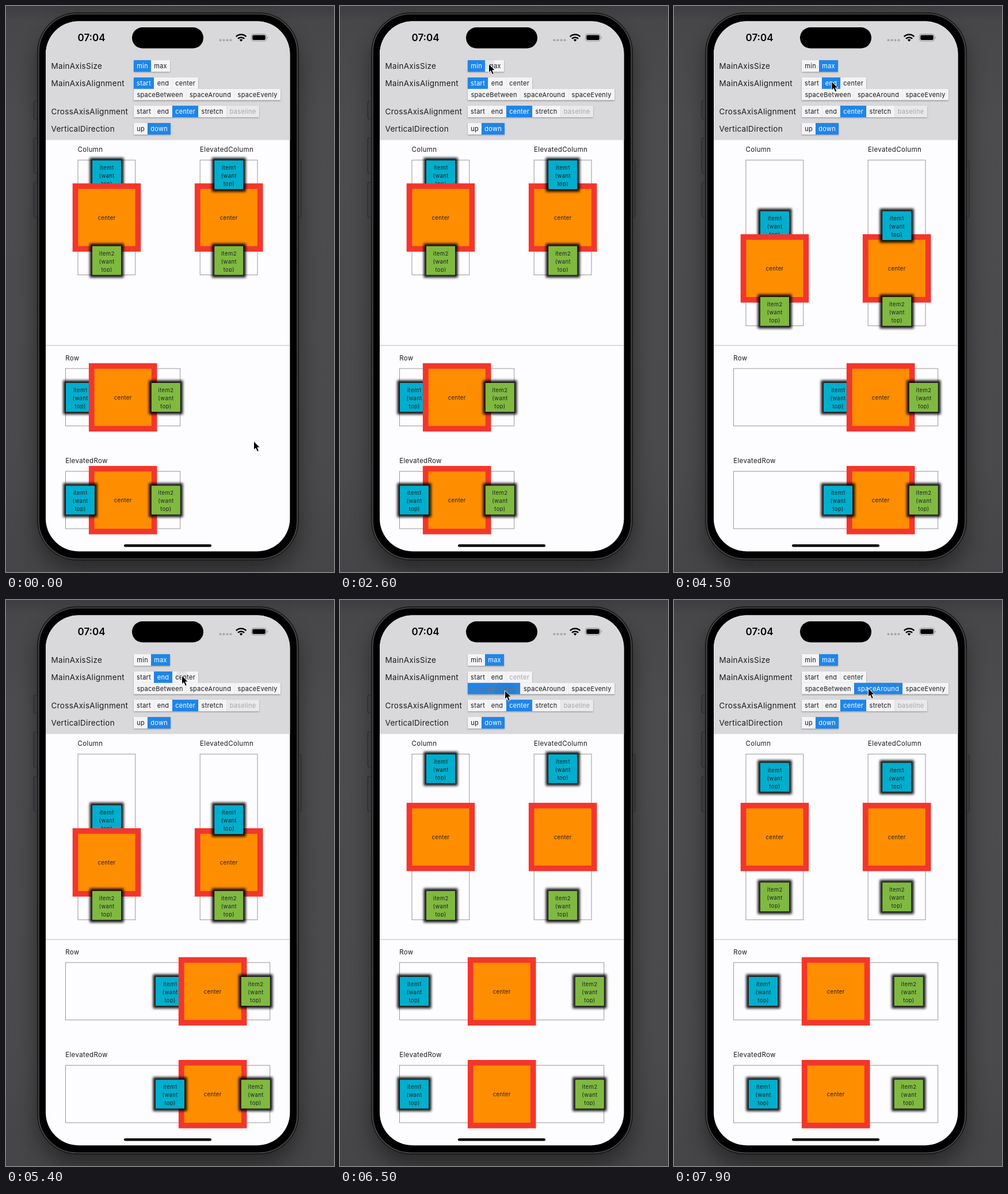
Write an HTML page that moves like this. It is 570 px wide and 982 px high and loops after 8 s.

```html
<!DOCTYPE html>
<html lang="en">
<head>
<meta charset="utf-8">
<title>Column and row alignment demo</title>
<style>
  html, body { margin: 0; width: 100%; height: 100%; overflow: hidden; background: #4a494b; }
  svg { display: block; }
  text { font-family: Inter, "Liberation Sans", sans-serif; fill: #1b1b1d; }
  .clock { font-size: 17px; font-weight: 600; fill: #000; }
  .label { font-size: 13.5px; letter-spacing: .3px; }
  .title { font-size: 11.5px; letter-spacing: .35px; }
  .toggle { font-size: 11px; letter-spacing: .28px; text-anchor: middle; }
  .note { font-size: 9.6px; letter-spacing: .35px; text-anchor: middle; fill: #1c2426; }
</style>
</head>
<body>
<svg id="stage" width="570" height="982" viewBox="0 0 570 982">
  <defs>
    <linearGradient id="wall" x2="0" y2="1">
      <stop offset="0" stop-color="#3e3d3f"/>
      <stop offset=".025" stop-color="#474648"/>
      <stop offset=".2" stop-color="#4c4b4d"/>
      <stop offset=".8" stop-color="#4a494b"/>
      <stop offset="1" stop-color="#454446"/>
    </linearGradient>
    <filter id="glow" x="-40%" y="-40%" width="180%" height="180%"><feGaussianBlur stdDeviation="2.3"/></filter>
    <filter id="soft" x="-10%" y="-30%" width="120%" height="170%"><feGaussianBlur stdDeviation="1.2"/></filter>
    <filter id="haze" x="-20%" y="-20%" width="140%" height="140%"><feGaussianBlur stdDeviation="18"/></filter>
    <clipPath id="screen"><rect x="69" y="26.5" width="424.4" height="919.7" rx="57"/></clipPath>
    <clipPath id="noteClip"><rect width="50" height="45"/></clipPath>
  </defs>

  <rect width="570" height="982" fill="url(#wall)"/>
  <rect x="54" y="34" width="455" height="946" rx="70" fill="#000" opacity=".4" filter="url(#haze)"/>
  <g fill="#3b3a3c" stroke="#29282a">
    <rect x="48" y="165" width="9" height="31" rx="2"/>
    <rect x="48" y="229" width="9" height="61" rx="2"/>
    <rect x="48" y="306" width="9" height="61" rx="2"/>
    <rect x="506" y="268" width="7" height="99" rx="2"/>
  </g>
  <rect x="54.5" y="11.5" width="454" height="950" rx="69" fill="#252527" stroke="#161617"/>
  <rect x="57" y="14" width="449" height="945" rx="66" fill="#000" stroke="#59585b" stroke-width="1.2"/>

  <g clip-path="url(#screen)">
    <rect x="69" y="26" width="425" height="921" fill="#fdfcff"/>
    <rect x="69" y="26" width="425" height="206.5" fill="#d9d8da"/>
    <path d="M69 589H494" stroke="#bbbabd"/>
    <g id="board"></g>
  </g>

  <rect x="219" y="37" width="124" height="36.5" rx="18.25"/>
  <text class="clock" x="124.5" y="61">07:04</text>
  <g id="signal" fill="#a5a4a6"></g>
  <g fill="none" stroke="#000" stroke-width="2.5">
    <path d="M399.8 53.2a12.6 12.6 0 0 1 17.6 0M403 56.7a8 8 0 0 1 11.2 0"/>
    <path d="M405.8 58.8a4 4 0 0 1 5.6 0L408.6 61.8z" fill="#000" stroke="none"/>
  </g>
  <rect x="426.5" y="48.8" width="26" height="12" rx="3.8" fill="none" stroke="#8b8a8c"/>
  <rect x="428.2" y="50.5" width="22.6" height="8.6" rx="2.3"/>
  <path d="M454 52.8q2.4 2 0 4z" fill="#8b8a8c"/>
  <rect x="205" y="934" width="152" height="4.5" rx="2.25"/>

  <path id="cursor" d="M0 0V15.2L3.4 12L6.1 18.2L8.9 17L6.3 11H11z" stroke="#fff" stroke-width="1" stroke-linejoin="round"/>
</svg>
<script>
const LOOP = 8000, STEP = 100, UNIT = 49.6, FADE = 130;
const BLUE = '#2085e8', PALE = '#f4f3f6';
const board = document.getElementById('board');
const cursor = document.getElementById('cursor');

function add(parent, tag, attrs = {}, text) {
  const el = document.createElementNS('http://www.w3.org/2000/svg', tag);
  for (const k in attrs) el.setAttribute(k, attrs[k]);
  if (text) el.textContent = text;
  parent.appendChild(el);
  return el;
}
const place = (el, x, y) => el.setAttribute('transform', `translate(${x} ${y})`);

for (let i = 0; i < 4; i++) {
  add(document.getElementById('signal'), 'circle', { cx: 372.5 + i * 6, cy: 59.3, r: 2 });
}

// Toggle rows: name, top edge, then label and right edge of each button
const toggles = {};
function toggleRow(group, y, ...cells) {
  const h = 20, right = cells[cells.length - 1][1];
  add(board, 'rect', { x: 222, y: y + 1.2, width: right - 222, height: h, fill: '#000', opacity: .3, filter: 'url(#soft)' });
  let x = 222;
  for (const [name, end] of cells) {
    const w = end - x, off = name === 'baseline';
    const box = add(board, 'svg', { x, y, width: w, height: h });
    const bg = add(box, 'rect', { width: w, height: h, fill: off ? '#e9e8eb' : PALE });
    if (x > 222) add(box, 'path', { d: `M.5 0V${h}`, stroke: '#000', opacity: .04 });
    const splash = add(box, 'circle', { fill: '#000', opacity: 0 });
    const text = add(box, 'text', { class: 'toggle', x: w / 2 + .1, y: 14 }, name);
    if (off) text.style.fill = '#a5a4a7';
    else toggles[group + name] = { x, y, bg, splash, text };
    x = end;
  }
}
function label(text, y) {
  add(board, 'text', { class: 'label', x: 78.5, y }, text);
}
label('MainAxisSize', 109);
label('MainAxisAlignment', 138.6);
label('CrossAxisAlignment', 188);
label('VerticalDirection', 217.7);
toggleRow('size', 94, ['min', 252], ['max', 285]);
toggleRow('main', 124, ['start', 257], ['end', 289], ['center', 334]);
toggleRow('main', 143.6, ['spaceBetween', 313], ['spaceAround', 397], ['spaceEvenly', 477]);
toggleRow('cross', 173, ['start', 257], ['end', 289], ['center', 334], ['stretch', 383], ['baseline', 440]);
toggleRow('dir', 203, ['up', 246], ['down', 286]);

function makeItem(parent, name, fill) {
  const g = add(parent, 'g');
  add(g, 'rect', { x: -4.5, y: -4.5, width: 59, height: 59, filter: 'url(#glow)', opacity: .9 });
  add(g, 'rect', { width: 50, height: 50, fill });
  const notes = add(g, 'g', { 'clip-path': 'url(#noteClip)' });
  [name, '(want', 'top)'].forEach((s, i) => add(notes, 'text', { class: 'note', x: 25.2, y: 16.2 + i * 13.9 }, s));
  return g;
}
function makeCenter(parent) {
  const g = add(parent, 'g');
  add(g, 'rect', { x: -59.3, y: -59.3, width: 118.6, height: 118.6, fill: '#f3362c' });
  add(g, 'rect', { x: -49.6, y: -49.6, width: 99.2, height: 99.2, fill: '#ff8d00' });
  add(g, 'text', { class: 'note', x: 0, y: 3.9 }, 'center');
  return g;
}

// A line of three boxes; main is the start on its axis, mid the middle of the other
function makeLine(title, tx, ty, row, elevated, main, mid) {
  add(board, 'text', { class: 'title', x: tx, y: ty }, title);
  const outline = add(board, 'rect', { fill: 'none', stroke: '#98979a' });
  const order = elevated ? 'cab' : 'acb', parts = {};
  for (const k of order) {
    parts[k] = k === 'c' ? makeCenter(board)
      : makeItem(board, k === 'a' ? 'item1' : 'item2', k === 'a' ? '#00aecd' : '#80b940');
  }
  const free = row ? 156 : 88.3;
  return (size, align) => {
    const room = size === 'max' ? free : 0;
    const len = UNIT * 4 + .8 + room;
    const set = (el, along, across) => row ? place(el, main + along, across) : place(el, across, main + along);
    const [a, c, b] = spread[align].map(f => f * room);
    set(parts.a, a, mid - 25);
    set(parts.c, c + UNIT * 2, mid);
    set(parts.b, b + UNIT * 3, mid - 25);
    const box = row ? [main - .5, mid - 50, len, 99.6] : [mid - 50, main - .5, 99.8, len];
    ['x', 'y', 'width', 'height'].forEach((k, i) => outline.setAttribute(k, box[i]));
  };
}
// Share of the free room in front of each box
const spread = {
  start: [0, 0, 0],
  end: [1, 1, 1],
  center: [.5, .5, .5],
  spaceBetween: [0, .5, 1],
  spaceAround: [1 / 6, .5, 5 / 6]
};
const lines = [
  makeLine('Column', 124.5, 253, false, false, 267.8, 175),
  makeLine('ElevatedColumn', 337, 253, false, true, 267.8, 387.2),
  makeLine('Row', 103.2, 614.5, true, false, 104, 679),
  makeLine('ElevatedRow', 103.2, 793, true, true, 104, 857.3)
];

// Time, group, newly chosen button
const clicks = [
  [1350, 'size', 'max'], [2050, 'size', 'min'], [2650, 'size', 'max'],
  [4250, 'main', 'end'], [5450, 'main', 'center'],
  [6450, 'main', 'spaceBetween'], [7350, 'main', 'spaceAround']
];
// Time, x, y of the pointer tip
const path = [
  [0, 430.5, 755], [200, 430.5, 755], [950, 274, 105], [1250, 273, 103], [1500, 273, 103],
  [1900, 238, 101], [2150, 238, 101], [2550, 258.5, 100.5], [3500, 259, 101],
  [4000, 274, 131], [4600, 274, 131], [5200, 305.5, 131], [5650, 305.5, 131],
  [6250, 286.5, 157], [6700, 286.5, 157], [7250, 337.5, 153], [LOOP, 337.5, 153]
];
function pointer(t) {
  const i = path.findIndex(p => p[0] > t);
  const [t0, x0, y0] = path[i - 1], [t1, x1, y1] = path[i];
  const u = (t - t0) / (t1 - t0), e = u * u * (3 - 2 * u);
  return [x0 + (x1 - x0) * e, y0 + (y1 - y0) * e];
}

function render(t) {
  const chosen = { size: 'min', main: 'start', cross: 'center', dir: 'down' };
  const fading = {};
  for (const [at, group, name] of clicks) {
    if (t < at) break;
    const u = Math.min(1, (t - at) / FADE);
    fading[group + chosen[group]] = 1 - u;
    fading[group + name] = u;
    chosen[group] = name;
  }
  const [px, py] = pointer(t);
  place(cursor, px, py);

  const active = Object.keys(chosen).map(g => g + chosen[g]);
  for (const key in toggles) {
    const { bg, splash, text } = toggles[key], on = active.includes(key);
    const shade = Math.round(24 + 231 * (fading[key] ?? +on));
    bg.setAttribute('fill', on ? BLUE : PALE);
    text.style.fill = `rgb(${shade},${shade},${shade})`;
    splash.setAttribute('opacity', 0);
  }
  for (const [at, group, name] of clicks) {
    const age = t - at + 100;
    if (age < 0 || age > 300) continue;
    const { x, y, splash } = toggles[group + name];
    splash.setAttribute('cx', px - x);
    splash.setAttribute('cy', py - y);
    splash.setAttribute('r', 6 + age * .08);
    splash.setAttribute('opacity', .08 * (1 - age / 300));
  }
  for (const line of lines) line(chosen.size, chosen.main);
}

function tick() {
  const t = performance.now() % LOOP;
  render(Math.floor(t / STEP) * STEP);
  requestAnimationFrame(tick);
}
tick();
</script>
</body>
</html>
```
